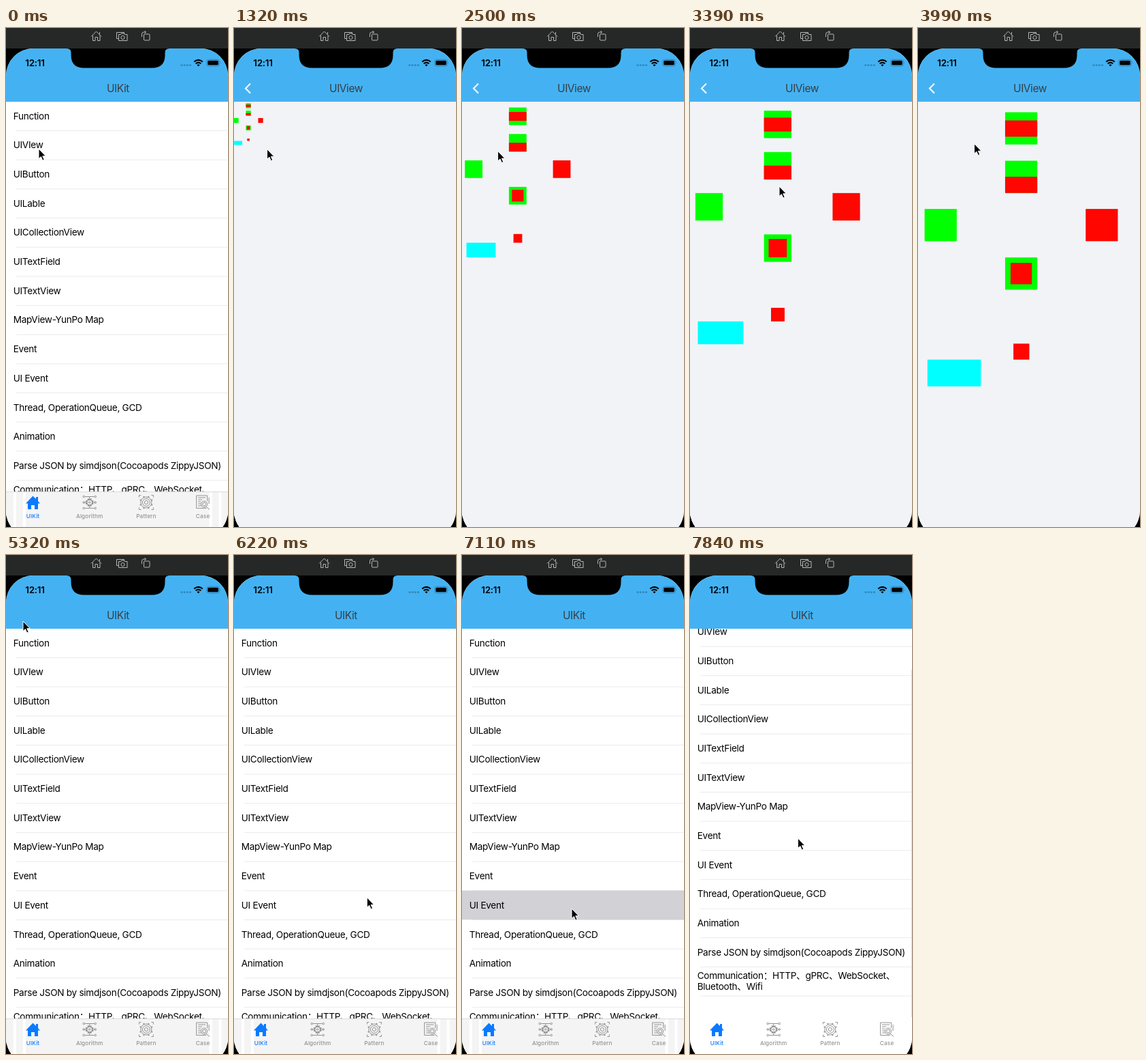
Animation of 326 by 731 pixels, one loop 7.99 s. Source, as an HTML page:

```html
<!DOCTYPE html>
<html lang="zh-CN">
<head>
<meta charset="utf-8">
<title>UIKit demo</title>
<style>
  html, body { margin: 0; width: 100%; height: 100%; overflow: hidden; background: #000; }
  svg { display: block; width: 326px; height: 731px; }
  text { font-family: Inter, "Noto Sans CJK SC", "Noto Sans CJK", sans-serif; }
  .row { font-size: 13.6px; letter-spacing: -.29px; }
  .title { font-size: 15.5px; letter-spacing: -.45px; fill: #373f46; text-anchor: middle; }
  .label { font-size: 8.2px; font-weight: 500; letter-spacing: .15px; text-anchor: middle; }
  .line { fill: none; stroke: currentColor; }
</style>
</head>
<body>
<svg viewBox="0 0 326 731">
  <defs>
    <clipPath id="screen"><rect y="30" width="326" height="717" rx="40"/></clipPath>
    <clipPath id="below"><rect y="108" width="326" height="623"/></clipPath>
  </defs>
  <rect width="326" height="731"/>
  <rect width="326" height="30" fill="#262827"/>

  <g class="line" color="#b4b6b5">
    <path d="M125 12.500l7.500-7.500 7.500 7.500M127.500 11v7.500h3.500v-5h3.500v5h3.500V11M137.500 9.500V6"/>
    <path d="M165 15.500h-2.500v-9h11V9M165.500 9.500h3l1-1.500h4l1 1.500h3.500v9h-12.500z"/>
    <circle cx="171.500" cy="14" r="2.600"/>
    <rect x="202.500" y="9" width="8.500" height="9" rx="1"/>
    <path d="M199.500 13V9q0-3 3-3h3M203.500 4l2 2-2 2"/>
  </g>

  <g clip-path="url(#screen)">
    <rect y="30" width="326" height="701" fill="#fff"/>
    <g clip-path="url(#below)">
      <g id="home">
        <rect y="108" width="326" height="623" fill="#fff"/>
        <g id="rows"></g>
        <rect id="scrollbar" x="325" y="168" width="1" height="509" fill="#ddd"/>
        <rect y="680" width="326" height="51" fill="#fff"/>
        <g id="tabBack">
          <rect y="679.500" width="326" height="52" fill="#f4f4f5"/>
          <path d="M0 679.500H326" stroke="#dcdcde"/>
          <path d="M13 680v51M27 680v51M300.500 680v51M314.500 680v51" stroke="#fff" stroke-width="4"/>
        </g>
        <g id="tabs"></g>
        <rect id="dim" y="108" width="326" height="623" opacity="0"/>
      </g>
      <g id="detail">
        <rect y="108" width="326" height="623" fill="#f2f3f7"/>
        <g id="shapes"></g>
      </g>
    </g>
    <rect y="30" width="326" height="78" fill="#44b2f2"/>
    <text id="homeTitle" class="title" x="164.500" y="94">UIKit</text>
    <g id="detailTitle">
      <text class="title" x="164.500" y="94">UIView</text>
      <path d="M24 81.500l-7 7 7 7" fill="none" stroke="#fff" stroke-width="2"/>
    </g>
    <path d="M89 30q6.500 0 6.500 6v3.500q0 19 19 19h100q19 0 19-19v-3.500q0-6 6.500-6z"/>
    <text x="42.500" y="56" font-size="13.500" font-weight="600" letter-spacing="-.3" text-anchor="middle">12:11</text>
    <path d="M256.500 54.500H272" stroke="#2b7db0" stroke-width="2" stroke-dasharray="2.800 1.400"/>
    <path d="M276.200 49.500q6.300-5.200 12.600 0M278.600 52.200q3.900-3.200 7.800 0" fill="none" stroke="#000" stroke-width="2"/>
    <path d="M280.300 54q2.200-1.600 4.400 0l-2.200 2.300z"/>
    <rect x="294.700" y="46.200" width="18.600" height="9.600" rx="2.700" fill="none" stroke="#2b7db0" stroke-width=".9"/>
    <rect x="296.200" y="47.700" width="15.600" height="6.600" rx="1.500"/>
    <path d="M314.500 49.500q1.500 1.500 0 3z" fill="#2b7db0"/>
  </g>
  <path id="cursor" d="M0 0V14.500L3.400 11.500 5.800 17 8.200 16 5.800 10.700H10.300Z" stroke="#fff"/>
</svg>
<script>
const LOOP = 7990, ROW = 42.67, TOP = 108;
const $ = id => document.getElementById(id);
const rows = [
  'Function', 'UIVIew', 'UIButton', 'UILable', 'UICollectionView', 'UITextField', 'UITextView',
  'MapView-YunPo Map', 'Event', 'UI Event', 'Thread, OperationQueue, GCD', 'Animation',
  'Parse JSON by simdjson(Cocoapods ZippyJSON)'
];
const rowText = (y, text) => `<text class="row" x="10.700" y="${y}">${text}</text>`;
const rowFill = (id, i) =>
  `<rect id="${id}" y="${TOP - .5 + ROW * i}" width="326" height="${ROW}" fill="#d1d1d6"/>`;

$('rows').innerHTML =
  Array.from({ length: 14 }, (_, i) =>
    `<path d="M15 ${TOP + ROW * (i + 1) - .2}H326" stroke="#e6e6e8" stroke-width=".8"/>`).join('') +
  rowFill('pickView', 1) + rowFill('pickEvent', 9) +
  rows.map((text, i) => rowText(133.800 + ROW * i, text)).join('') +
  rowText(680.500, 'Communication：HTTP、gPRC、WebSocket、') + rowText(696, 'Bluetooth、Wifi');

// Calls draw with the cosine and sine of n evenly spaced angles.
const around = (n, draw) => Array.from({ length: n }, (_, i) => {
  const a = (i + .5) / n * 2 * Math.PI;
  return draw(Math.cos(a), Math.sin(a));
}).join('');
const ring = (r, width = 1) => `<circle class="line" r="${r}" stroke-width="${width}"/>`;
const spokes = (n, from, to) => around(n, (c, s) =>
  `<path class="line" stroke-width="2" d="M${c * from} ${s * from}L${c * to} ${s * to}"/>`);
const icons = {
  UIKit: '<path fill="currentColor" d="M-10.500 1.500L0-9.500 4.500-5V-8H7.500V-2L10.500 1.500H7.500V10H2.500V4H-2.500V10H-7.500V1.500Z"/>',
  Algorithm: ring(4, 1.500) + ring(1.300) + spokes(8, 4, 6) +
    '<path class="line" d="M-7-8.500H7M-7 8.500H7M0-8.500V-4M0 8.500V4M-8.500 0H-4M8.500 0H4"/>' +
    [-8.500, 0, 8.500].map(y => [-8.500, 8.500].map(x =>
      `<circle class="line" cx="${x}" cy="${y}" r="1.300"/>`).join('')).join(''),
  Pattern: ring(2.600) + ring(5.500) + ring(8) + spokes(8, 8, 10) +
    '<path class="line" d="M-10.500-7.500V-10.500H-7.500M7.500-10.500H10.500V-7.500M10.500 7.500V10.500H7.500M-7.500 10.500H-10.500V7.500"/>',
  Case: '<path class="line" d="M5 8.500H-9.500V-10H6.500V-2M-7-7H4M-7-4H-1M-7-1H-3M-7 2H-3M-7 5H-2M9-7V2M4.500 6L10 10.500"/>' +
    '<circle class="line" cx="2" cy="2.500" r="4.500"/><circle class="line" cx="2" cy="2.500" r="2.500"/>'
};
$('tabs').innerHTML = Object.entries(icons).map(([name, icon], i) => `
  <g color="${i ? '#929292' : '#0a7aff'}" transform="translate(${39.500 + 83.200 * i} 695)">
    ${icon}<text class="label" y="22.500" fill="currentColor">${name}</text>
  </g>`).join('');

const box = (color, x, y, w, h = w) =>
  `<rect x="${x}" y="${y}" width="${w}" height="${h}" fill="${color}"/>`;
const GREEN = '#0f0', RED = '#ff0600';
$('shapes').innerHTML =
  box(GREEN, 137, 16.500, 50.500) + box(RED, 137, 29.300, 50.500, 25.500) +
  box(GREEN, 137, 92.500, 50.500) + box(RED, 137, 117.500, 50.500, 25.500) +
  box(GREEN, 10.500, 168, 50.500) + box(RED, 263.500, 168, 50.500) +
  box(GREEN, 137, 244, 50.500) + box(RED, 145.500, 252.500, 33.500) +
  box(RED, 150, 379, 25) + box('#0ff', 15, 404, 84, 42);

// Cursor tip: time, x, y
const path = [
  [0, 48, 177], [2400, 49, 178], [3200, 131, 232], [3600, 131, 232], [4450, 21, 90],
  [4900, 21, 90], [5320, 25, 97], [5740, 226, 487], [5850, 226, 487], [6620, 161, 518],
  [7120, 161, 518], [7780, 158.500, 415], [LOOP, 158.500, 415]
];
const progress = (t, from, to) => Math.min(1, Math.max(0, (t - from) / (to - from)));
const smooth = u => u * u * (3 - 2 * u);
const easeOut = u => 1 - (1 - u) ** 3;
const move = (id, x, y, more = '') => $(id).setAttribute('transform', `translate(${x} ${y})${more}`);
const fade = (id, opacity) => $(id).setAttribute('opacity', opacity);

function cursorAt(t) {
  const i = path.findIndex(([time]) => time > t);
  const [t0, x0, y0] = path[i - 1], [t1, x1, y1] = path[i];
  const u = smooth(progress(t, t0, t1));
  return [x0 + (x1 - x0) * u, y0 + (y1 - y0) * u];
}

// Follows the drag, then resists past the end of the list.
function scrollFor(drag) {
  const end = 24, height = 572, over = drag - end;
  return over <= 0 ? drag : end + height * (1 - 1 / (over * .55 / height + 1));
}

function draw(t) {
  const shown = easeOut(progress(t, 330, 760)) - easeOut(progress(t, 4840, 5260));
  move('home', -98 * shown, 0);
  move('detail', 326 * (1 - shown), 0);
  fade('dim', .1 * shown);
  fade('homeTitle', 1 - shown);
  fade('detailTitle', shown);

  const size = Math.max(0, .4955 + .513 * Math.sin(.00067 * (t - 2455)));
  move('shapes', -2.300 * (1 - size), TOP, ` scale(${size})`);

  const [x, y] = cursorAt(t);
  move('cursor', x, y);
  const scroll = t > 7120 ? scrollFor(Math.max(0, 518 - y - 11)) : 0;
  move('rows', 0, -scroll);
  fade('tabBack', scroll < 24 ? 1 : 0);
  fade('scrollbar', scroll > 0 ? 1 : 0);
  fade('pickView', t >= 150 && t < 800 ? 1 : 0);
  fade('pickEvent', t >= 6960 && scroll === 0 ? 1 : 0);
}

function tick() {
  draw(performance.now() % LOOP);
  requestAnimationFrame(tick);
}
tick();
</script>
</body>
</html>
```
